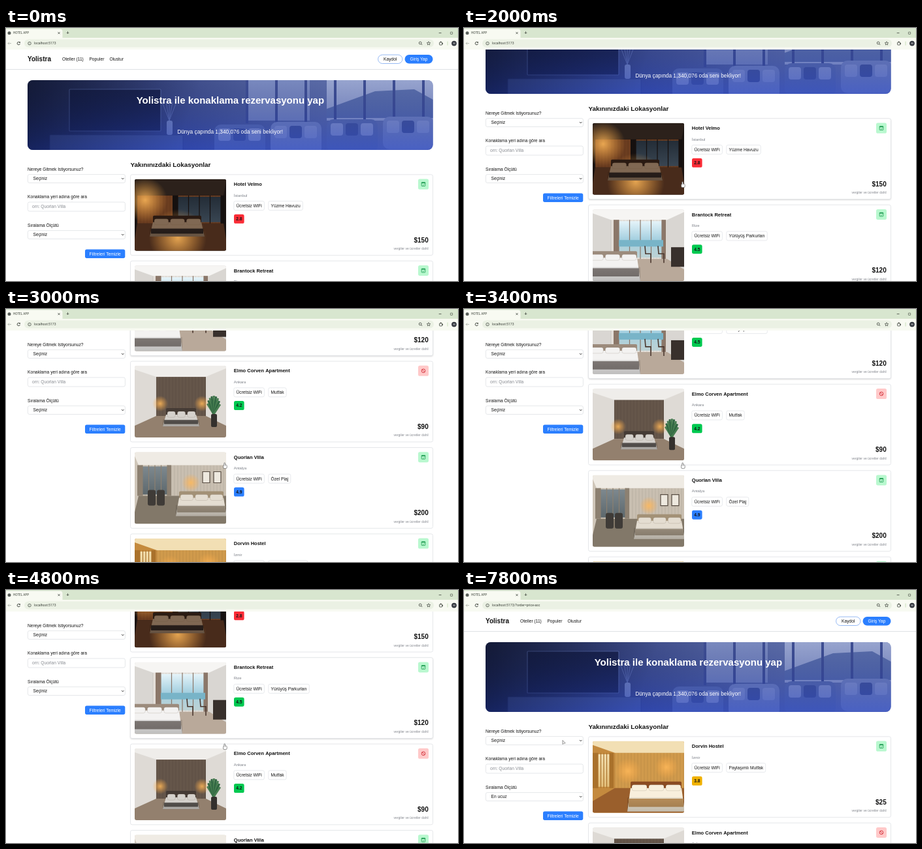
These frames come from a looping animation (692x388 px, 8 s). An HTML page with a canvas:

```html
<!DOCTYPE html>
<html lang="tr">
<head>
<meta charset="utf-8">
<title>HOTEL APP</title>
<style>
html, body { margin: 0; width: 100%; height: 100%; overflow: hidden; background: #fff; }
canvas { display: block; width: 692px; height: 388px; }
</style>
</head>
<body>
<canvas id="stage"></canvas>
<script>
const W = 692, H = 388, LOOP = 8000;
const canvas = document.getElementById('stage');
const dpr = window.devicePixelRatio || 1;
canvas.width = W * dpr;
canvas.height = H * dpr;
const c = canvas.getContext('2d');

const SANS = '"Liberation Sans", Arial, sans-serif';
const UI = 'Roboto, "Open Sans", sans-serif';
const BLUE = '#2b7fff', LINE = '#dfe1e5', BRAND = 'Yolistra';

// Drawing helpers
function text(s, x, y, size = 6.66, color = '#151515', o = {}) {
  c.font = `${o.bold ? 'bold ' : ''}${size}px ${o.font || SANS}`;
  c.textAlign = o.align || 'left';
  c.fillStyle = color;
  c.fillText(s, x, y + size * 0.35);
}
function rect(color, x, y, w, h) {
  c.fillStyle = color;
  c.fillRect(x, y, w, h);
}
function paint(fill, stroke, lw) {
  if (fill) { c.fillStyle = fill; c.fill(); }
  if (stroke) { c.strokeStyle = stroke; c.lineWidth = lw; c.stroke(); }
}
function round(x, y, w, h, r, fill, stroke, lw = 0.8) {
  c.beginPath();
  c.roundRect(x, y, w, h, r);
  paint(fill, stroke, lw);
}
function disc(x, y, r, fill, stroke, lw = 0.7) {
  c.beginPath();
  c.arc(x, y, r, 0, 7);
  paint(fill, stroke, lw);
}
function trace(pts) {
  c.beginPath();
  for (let i = 0; i < pts.length; i += 2) c.lineTo(pts[i], pts[i + 1]);
}
function poly(color, ...pts) {
  trace(pts);
  paint(color);
}
function line(color, lw, ...pts) {
  trace(pts);
  paint(null, color, lw);
}
function cross(x, y, r, color) {
  line(color, 0.8, x - r, y - r, x + r, y + r);
  line(color, 0.8, x - r, y + r, x + r, y - r);
}
function fade(x0, y0, x1, y1, ...colors) {
  const g = c.createLinearGradient(x0, y0, x1, y1);
  colors.forEach((k, i) => g.addColorStop(i / (colors.length - 1), k));
  return g;
}
function glow(x, y, r) {
  const g = c.createRadialGradient(x, y, 0, x, y, r);
  g.addColorStop(0, 'rgba(255,185,90,.85)');
  g.addColorStop(1, 'rgba(255,170,70,0)');
  rect(g, x - r, y - r, 2 * r, 2 * r);
}
function clipped(x, y, w, h, r, draw) {
  c.save();
  c.translate(x, y);
  c.beginPath();
  c.roundRect(0, 0, w, h, r);
  c.clip();
  draw();
  c.restore();
}

// Room pictures, each 140 x 110: a box in perspective, a window, lamps and a bed
function bed(x, y, w, h, sheet, blanket, head) {
  round(x, y - 10, w, 14, 2, head);
  poly(sheet, x, y, x + w, y, x + w + 5, y + h, x - 5, y + h);
  for (let i = 0; i < 3; i++) round(x + 2 + i * w / 3, y - 5, w / 3 - 3, 9, 3, sheet, 'rgba(90,70,50,.3)', 0.5);
  rect(blanket, x - 3, y + h * 0.45, w + 6, h * 0.35);
  rect(fade(0, y, 0, y + h, 'rgba(0,0,0,0)', 'rgba(0,0,0,.22)'), x - 5, y + h * 0.4, w + 10, h * 0.6);
}
function room(o) {
  const [l, r, top, bottom] = o.back;
  rect(o.side, 0, 0, 140, 110);
  rect(o.wall, l, top, r - l, bottom - top);
  for (let x = l; x < r; x += 5) line('rgba(0,0,0,.09)', 0.8, x, top, x, bottom);
  poly(o.ceiling, 0, 0, 140, 0, 140, 4, r, top, l, top, 0, 6);
  poly(o.floor, 0, 92, l, bottom, r, bottom, 140, 92, 140, 110, 0, 110);
  if (o.glass) {
    const [x, w] = o.glass, h = bottom - top;
    rect(fade(0, top, 0, bottom, ...o.sky), x, top + 2, w, h - 4);
    for (let i = 0; i <= 4; i++) line(o.frame, 1.2, x + i * w / 4, top, x + i * w / 4, bottom);
    rect(o.frame, x - 8, top, 8, h);
    rect(o.frame, x + w, top, 6, h);
  }
  o.lamps.forEach(p => glow(...p));
  bed(...o.bed);
  if (o.extra) o.extra();
}
function plant() {
  for (let i = 0; i < 9; i++) {
    const a = -2.9 + i * 0.34;
    line(i % 2 ? '#2f6541' : '#477d50', 3, 121, 74, 121 + 10 * Math.cos(a), 62 + 16 * Math.sin(a));
  }
  round(117, 74, 9, 20, 2, '#34302d');
}
function pictures() {
  for (const x of [104, 121]) round(x, 30, 11, 17, 0, '#eee9df', '#564b41', 1.2);
  for (const x of [20, 34]) round(x, 58, 12, 24, 3, '#3f3b37');
}
function seaside() {
  rect('#78b4c8', 40, 47, 68, 10);
  for (const x of [80, 100]) line('#4b382f', 1.6, x, 56, x + 1, 68, x + 9, 68, x + 9, 82);
  rect('#38302c', 120, 58, 20, 30);
}
const nightRoom = () => room({
  back: [4, 136, 25, 68], side: '#1b1412', wall: '#6b3d20', ceiling: '#2c211b', floor: '#482b1b',
  glass: [66, 66], sky: ['#222b35', '#3a4754'], frame: '#15100f',
  lamps: [[16, 32, 34], [66, 90, 44]],
  bed: [28, 66, 74, 22, '#806853', '#2b211d', '#2a1a12'],
});
const seaRoom = () => room({
  back: [28, 114, 16, 76], side: '#d9d6d2', wall: '#e4dfd9', ceiling: '#f6f5f3', floor: '#b9a99a',
  glass: [40, 66], sky: ['#eaf6fb', '#a5d0e0', '#bfd2d3'], frame: '#8b7769',
  lamps: [], extra: seaside,
  bed: [-8, 74, 76, 36, '#f3f2f1', '#8a8380', '#9c8b7c'],
});
const panelRoom = () => room({
  back: [33, 109, 17, 77], side: '#dedad5', wall: '#65564a', ceiling: '#efedea', floor: '#93806e',
  lamps: [[39, 58, 12], [103, 58, 12]], extra: plant,
  bed: [48, 75, 46, 18, '#d5d1cc', '#5d5854', '#453b35'],
});
const creamRoom = () => room({
  back: [6, 140, 20, 67], side: '#cfc6b9', wall: '#c9bfb1', ceiling: '#efebe4', floor: '#827869',
  glass: [12, 38], sky: ['#7f8a90', '#5b666b'], frame: '#8c8071',
  lamps: [[86, 47, 14]], extra: pictures,
  bed: [68, 70, 68, 28, '#e4ddd1', '#a49785', '#a39176'],
});
const warmRoom = () => room({
  back: [34, 140, 18, 72], side: '#c48a3e', wall: '#d09a4c', ceiling: '#f2dfb4', floor: '#9a5f2c',
  glass: [8, 18], sky: ['#f4e2b4', '#e2bd77'], frame: '#a9712b',
  lamps: [[54, 46, 20], [113, 40, 18]],
  bed: [58, 72, 78, 36, '#f8efdc', '#c99b62', '#8a4b22'],
});

// Living room banner, 621 x 107
function hero() {
  rect(fade(0, 0, 621, 0, '#232c55', '#3f4d8a', '#5f70ad', '#7787bd'), 0, 0, 621, 107);
  round(64, 14, 140, 64, 1, '#1c2550', '#5f72b2', 1.2);
  round(34, 84, 204, 24, 1, '#53659f', '#33427f');
  round(213, 62, 9, 22, 3, '#8d9fd8');
  for (let i = -2; i < 3; i++) line('#7184c4', 0.9, 217, 62, 217 + i * 5, 30 + Math.abs(i) * 3);
  // windows and mountain
  rect('#8797cc', 336, 0, 96, 62);
  rect('#a9b6df', 458, 0, 163, 62);
  poly('#6378b4', 458, 44, 532, 17, 592, 14, 621, 30, 621, 58, 458, 58);
  for (let x = 334; x < 621; x += 45) rect('#44549a', x, 0, 4, 66);
  // seating
  for (let i = 0; i < 4; i++) {
    const x = 286 + i * 86, y = 68 - i * 4;
    round(x, y, 78, 50, 10, i % 2 ? '#8495cc' : '#6679b6');
    for (let k = 0; k < 3; k++) round(x + 6 + k * 23, y + 6, 19, 19, 4, k % 2 ? '#4a5c9f' : '#9baadc');
  }
  rect(fade(0, 0, 0, 107, 'rgba(20,32,90,.12)', 'rgba(34,62,190,.6)'), 0, 0, 621, 107);
  rect(fade(0, 0, 240, 80, 'rgba(6,10,25,.5)', 'rgba(6,10,25,0)'), 0, 0, 621, 107);
}

const WIFI = 'Ücretsiz WiFi';
const hotel = (name, city, extra, score, tone, price, free, art) =>
  ({ name, city, extra, score, tone, price, free, art });
const hotels = [
  hotel('Hotel Velmo', 'İstanbul', 'Yüzme Havuzu', '2.8', '#fb2c36', 150, true, nightRoom),
  hotel('Brantock Retreat', 'Rize', 'Yürüyüş Parkurları', '4.5', '#00c950', 120, true, seaRoom),
  hotel('Elmo Corven Apartment', 'Ankara', 'Mutfak', '4.2', '#00c950', 90, false, panelRoom),
  hotel('Quorlan Villa', 'Antalya', 'Özel Plaj', '4.9', '#2b7fff', 200, true, creamRoom),
  hotel('Dorvin Hostel', 'İzmir', 'Paylaşımlı Mutfak', '3.8', '#f0b100', 25, true, warmRoom),
];
const byPrice = [...hotels].sort((a, b) => a.price - b.price);

function chip(s, x, y) {
  c.font = `6.66px ${SANS}`;
  const w = c.measureText(s).width + 7.4;
  round(x, y - 7, w, 14, 2.4, '#fff', LINE, 0.7);
  text(s, x + 3.7, y);
  return x + w + 6.4;
}
function status(free, x, y) {
  const ink = free ? '#1f9c52' : '#d3303a';
  round(x - 8, y - 8, 16, 16, 2.6, free ? '#b9f8cf' : '#ffc9c9');
  if (free) {
    round(x - 2.8, y - 2.8, 5.6, 5.8, 0.6, null, ink);
    rect(ink, x - 2.8, y - 2.8, 5.6, 1.5);
    line(ink, 0.7, x - 1.3, y + 0.9, x - 0.3, y + 1.8, x + 1.5, y + 0.1);
  } else {
    disc(x, y, 2.8, null, ink, 0.9);
    line(ink, 0.9, x - 2, y - 2, x + 2, y + 2);
  }
}
function card(h, y, raised) {
  c.save();
  if (raised) {
    c.shadowColor = 'rgba(0,0,0,.2)';
    c.shadowBlur = 2.5 * dpr;
    c.shadowOffsetY = dpr;
  }
  round(190.5, y, 463, 123.8, 2.6, '#fff');
  c.restore();
  round(190.5, y, 463, 123.8, 2.6, null, LINE);
  clipped(197, y + 7, 140, 110, 3, h.art);
  text(h.name, 348.8, y + 14.7, 7.5, '#111', { bold: true });
  status(h.free, 639, y + 14.7);
  text(h.city, 348.8, y + 31.7, 5.83, '#7b7f87');
  chip(h.extra, chip(WIFI, 348.8, y + 47.7), y + 47.7);
  round(349, y + 61, 15.6, 14, 2.6, h.tone);
  text(h.score, 356.8, y + 68, 6.66, '#151515', { bold: true, align: 'center' });
  text('$' + h.price, 646.7, y + 100.2, 10, '#111', { bold: true, align: 'right' });
  text('vergiler ve ücretler dahil', 646.7, y + 113.6, 5, '#85888f', { align: 'right' });
}

function button(s, x, y, w, r, filled = true) {
  round(x, y, w, 13.4, r, filled ? BLUE : '#fff', filled ? null : '#6a9cf0', 0.7);
  text(s, x + w / 2, y + 6.7, 6.66, filled ? '#fff' : '#151515', { align: 'center' });
}
function select(value, y, focused) {
  round(33.4, y - 6.4, 149, 12.9, 2.4, '#fff', focused ? '#1b1b1b' : LINE, focused ? 1.1 : 0.8);
  text(value, 41.5, y);
  line('#222', 0.9, 177, y - 0.9, 178.7, y + 0.9, 180.4, y - 0.9);
}
function sidebar(dy, order, focused) {
  c.save();
  c.translate(0, -dy);
  text('Nereye Gitmek Istiyorsunuz?', 33, 216.4);
  select('Seçiniz', 231);
  text('Konaklama yeri adına göre ara', 33, 258.5);
  round(33.4, 267, 149, 14, 2.4, '#fff', LINE);
  text('orn: Quorlan Villa', 40, 274, 6.66, '#8a8d93');
  text('Sıralama Ölçütü', 33, 302.2);
  select(order, 317, focused);
  button('Filtreleri Temizle', 121, 339.5, 61.3, 2.6);
  c.restore();
}
function page(scroll, list, raised, order, focused) {
  c.save();
  c.translate(0, -scroll);
  text(BRAND, 33, 47.6, 10, '#111', { bold: true });
  text('Oteller (11)', 86, 47.7);
  text('Populer', 127.4, 47.7);
  text('Olustur', 158.4, 47.7);
  button('Kaydol', 569.6, 41.1, 37.3, 6.7, false);
  button('Giriş Yap', 610.5, 41.1, 43, 6.7);
  rect('#dcdee2', 0, 63, W, 0.9);
  clipped(33, 80, 620.6, 107, 8, hero);
  text(BRAND + ' ile konaklama rezervasyonu yap', 343.4, 110.3, 15, '#fff', { bold: true, align: 'center' });
  text('Dünya çapında 1,340,076 oda seni bekliyor!', 343.2, 158.6, 8.3, '#fff', { align: 'center' });
  text('Yakınınızdaki Lokasyonlar', 190.5, 210, 9.9, '#111', { bold: true });
  list.forEach((h, i) => card(h, 224.8 + 132.4 * i, i === raised));
  c.restore();
  sidebar(Math.min(scroll, 162), order, focused);
}

function star(x, y, r, color) {
  const pts = [];
  for (let i = 0; i < 11; i++) {
    const a = (i / 5 - 0.5) * Math.PI, d = i % 2 ? r * 0.45 : r;
    pts.push(x + d * Math.cos(a), y + d * Math.sin(a));
  }
  line(color, 0.7, ...pts);
}
function browser(path) {
  const ink = '#3c423a', y = 23.6;
  rect('#d8e6cf', 0, 0, W, 16);
  rect('#f8faf2', 0, 15, W, 18);
  round(0, 1.5, 86.5, 16, [0, 4, 0, 0], '#f8faf2');
  disc(5, 7.8, 2.5, '#5a605b');
  text('HOTEL APP', 11, 7.8, 4.6, ink, { font: UI });
  cross(81, 7.7, 1.5, ink);
  text('+', 94.5, 7.6, 8, ink, { font: UI, align: 'center' });
  rect(ink, 662.7, 7.3, 3.8, 0.8);
  round(680.4, 6.2, 3.2, 3.2, 0.5, null, ink, 0.6);
  line('#a8afa5', 0.8, 8, y, 3, y, 5, y - 2);
  line('#a8afa5', 0.8, 3, y, 5, y + 2);
  c.beginPath();
  c.arc(19.3, y, 2.2, 0.2, 5.5);
  paint(null, ink, 0.9);
  rect(ink, 20.2, 21.2, 1.7, 1.7);
  round(28, 17.6, 627, 12, 6, '#ebf1e4');
  disc(36, y, 2.3, null, ink);
  text('i', 36, y, 3.6, ink, { font: UI, align: 'center' });
  text('localhost:5173' + path, 43, y, 5.1, ink, { font: UI });
  disc(634.2, 23, 1.9, null, ink, 0.8);
  line(ink, 0.9, 635.6, 24.4, 637.2, 26);
  star(647, y, 2.9, ink);
  round(663.6, 21.8, 4.2, 4.2, 0.6, null, ink);
  disc(665.7, 21.4, 0.9, ink);
  disc(668.2, 23.9, 0.9, ink);
  rect('#c3dcb5', 675.6, 20.6, 0.9, 6);
  disc(686, y, 3.9, '#34383f');
  text('M', 686, y, 3.6, '#e8e8e8', { font: UI, align: 'center' });
}

function pointer(x, y, hand) {
  const edge = '#4a4a4a';
  if (hand) {
    round(x - 2.4, y, 5.6, 5.6, 1.6, '#fff', edge, 0.6);
    round(x - 1.2, y - 3.2, 1.7, 5, 0.8, '#fff', edge, 0.6);
    rect('#fff', x - 0.9, y - 0.5, 1.1, 3);
  } else {
    trace([x, y, x, y + 6, x + 1.6, y + 4.7, x + 4.2, y + 4.4]);
    c.closePath();
    paint('#fff', edge, 0.6);
  }
}

// Motion: each move is [start, duration, ...change] with a smooth start and stop
function glide(from, moves, t) {
  return from.map((v, i) => moves.reduce((sum, [start, span, ...by]) => {
    const k = Math.min(1, Math.max(0, (t - start) / span));
    return sum + by[i] * k * k * (3 - 2 * k);
  }, v));
}
const wheel = [[1800, 400, 172], [2400, 600, 237.5], [3200, 650, -156]];
const mouse = [
  [1000, 600, -85, -157], [5200, 400, -170, -167], [5600, 100, -16, 80],
  [6100, 100, 9.5, 23.5], [6900, 700, -7.5, 55],
];

function draw(t) {
  c.setTransform(dpr, 0, 0, dpr, 0, 0);
  rect('#fff', 0, 0, W, H);
  const sorted = t >= 6300;
  const scroll = sorted ? 0 : glide([0], wheel, t)[0];
  const raised = t < 1400 || t >= 5500 ? -1 : t < 2700 ? 0 : 1;
  const focused = t >= 6200 && t < 7800;
  page(scroll, sorted ? byPrice : hotels, raised, sorted ? 'En ucuz' : 'Seçiniz', focused);
  browser(sorted ? '/?order=price-asc' : '');
  if (t >= 1000) pointer(...glide([420, 396], mouse, t), t < 5500);
}

// The picture advances ten times a second
const start = performance.now();
let last = -1;
function tick() {
  const t = Math.floor(((performance.now() - start) % LOOP) / 100) * 100;
  if (t !== last) draw(last = t);
  requestAnimationFrame(tick);
}
tick();
</script>
</body>
</html>
```
